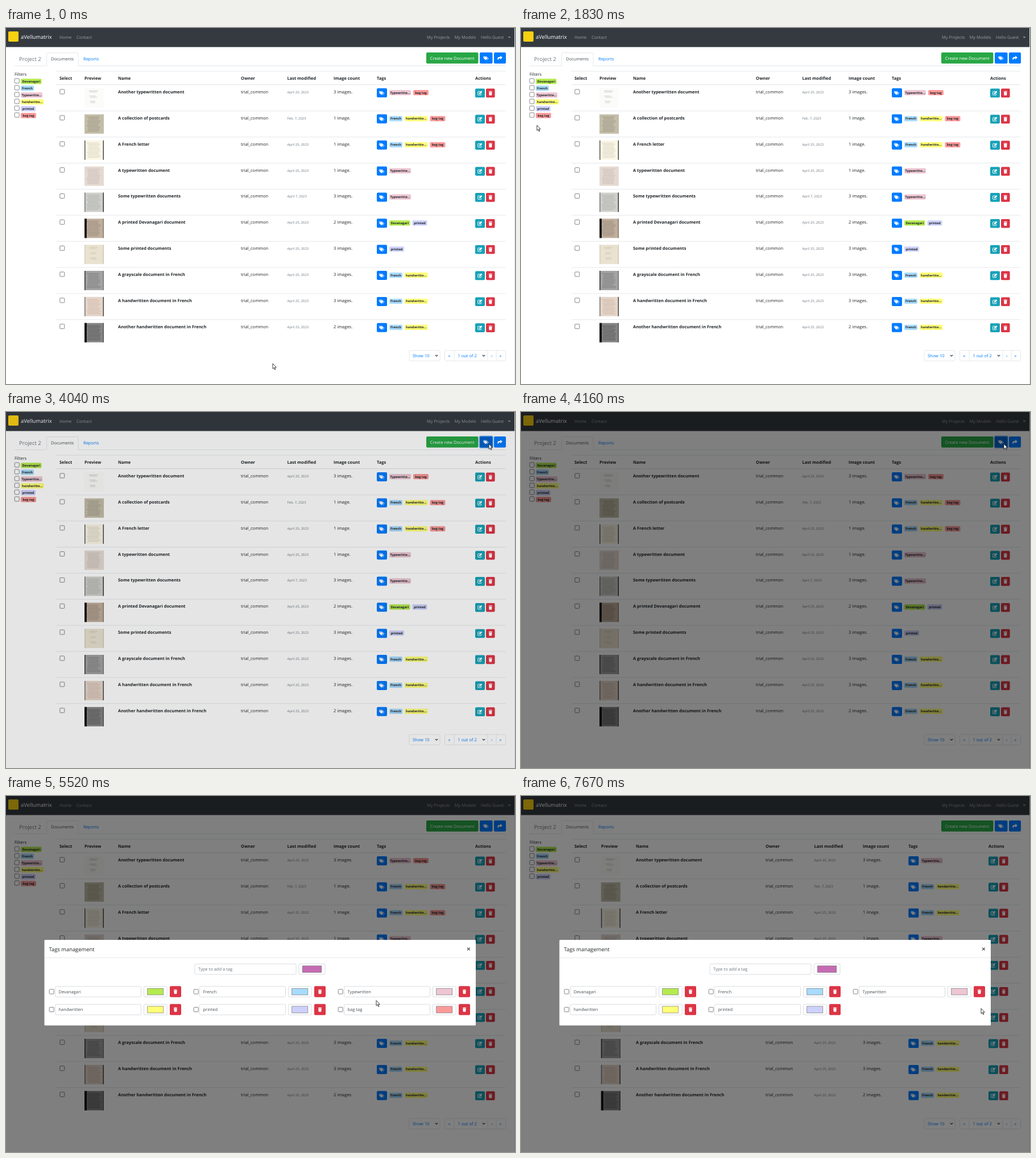
Write an HTML page that moves like this. It is 895 by 626 pixels and loops after 8000 ms.

```html
<!DOCTYPE html>
<html lang="en">
<head>
<meta charset="utf-8">
<title>Documents</title>
<style>
  html, body { margin: 0; width: 100%; height: 100%; overflow: hidden; background: #fff; }
  svg { display: block; }
  text { font-family: "Open Sans", "Noto Sans", sans-serif; text-rendering: geometricPrecision; white-space: pre; }
</style>
</head>
<body>
<svg id="stage" width="895" height="626" viewBox="0 0 895 626"></svg>
<script>
const LOOP = 8000, ROW_TOP = 100, ROW_H = 45.86;
const INK = '#212529', BLUE = '#007bff', RED = '#dc3545', LINE = '#dee2e6', GREY = '#6c757d';

// name, badge width, colour
const TAGS = {
  D: ['Devanagari', 36.5, '#b5ea50'],
  F: ['French', 23, '#a8dbfd'],
  T: ['Typewritten', 38, '#edc6d3'],
  H: ['handwritten', 40.5, '#ffff78'],
  P: ['printed', 26, '#cdd1fb'],
  B: ['bag tag', 27, '#fc9a9a']
};

// name, modified, images, tags, paper, ink, left edge, right edge
const ROWS = [
  ['Another typewritten document', 'April 25, 2023', 3, 'TB', '#fbfbfa', '#b9b9b9'],
  ['A collection of postcards', 'Feb. 7, 2023', 1, 'FHB', '#c3bda9', '#8f8a78'],
  ['A French letter', 'April 25, 2023', 1, 'FHB', '#faf6e6', '#cbc6b4', '#555', '#444'],
  ['A typewritten document', 'April 25, 2023', 1, 'T', '#e4dad2', '#bfb2ad'],
  ['Some typewritten documents', 'April 7, 2023', 3, 'T', '#cfd0cb', '#a2a5a2', '#777', '#333'],
  ['A printed Devanagari document', 'April 25, 2023', 2, 'DP', '#bfae9c', '#8d7d6f', '#1c1917', '#8a7b6c'],
  ['Some printed documents', 'April 25, 2023', 3, 'P', '#e9e2d0', '#c5bda9', '#d6cebb', '#d0c8b6'],
  ['A grayscale document in French', 'April 25, 2023', 3, 'FH', '#a3a3a3', '#6f6f6f', '#333', '#777'],
  ['A handwritten document in French', 'April 25, 2023', 3, 'FH', '#e5d5c8', '#c6afa5', '#777', '#444'],
  ['Another handwritten document in French', 'April 25, 2023', 2, 'FH', '#858585', '#4b4b4b', '#0c0c0c', '#555']
];

const text = (x, y, s, fill = INK, size = 7.5, extra = '') =>
  `<text x="${x}" y="${y}" fill="${fill}" font-size="${size}" ${extra}>${s}</text>`;
const bold = (x, y, s, size = 7.45) => text(x, y, s, INK, size, 'font-weight="700"');
const rect = (x, y, w, h, fill, rx = 0, extra = '') =>
  `<rect x="${x}" y="${y}" width="${w}" height="${h}" rx="${rx}" fill="${fill}" ${extra}/>`;
const frame = (x, y, w, h, stroke = LINE, rx = 2) =>
  rect(x + .5, y + .5, w - 1, h - 1, '#fff', rx, `stroke="${stroke}" stroke-width=".8"`);
const path = (d, stroke, width = 1, fill = 'none', extra = '') =>
  `<path d="${d}" stroke="${stroke}" stroke-width="${width}" fill="${fill}" ${extra}/>`;
const hline = (x1, x2, y, width = .8) => path(`M${x1} ${y}H${x2}`, LINE, width);
const checkbox = (x, y) => rect(x, y, 8, 8, '#fff', 1.2, 'stroke="#767676" stroke-width=".9"');
const chevron = (x, y) => path(`M${x - 2.3} ${y - 1.1}l2.3 2.3 2.3-2.3`, '#343a40', 1.1);

// Icons are centred on the origin
const ICONS = {
  tags: path('M-4.8-3.1h2.9L2-.1Q2.5.4 2 .9L-.4 3.3Q-.9 3.8-1.4 3.3L-4.8-.1Z', 'none', 0, '#fff') +
        path('M-.5-3.1 3.5.3Q4 .8 3.5 1.3L1.2 3.6', '#fff', 1) +
        '<circle cx="-3.3" cy="-1.6" r=".75" fill="#007bff"/>',
  edit: path('M.8-2.6H-3.2Q-3.8-2.6-3.8-2V2.8Q-3.8 3.4-3.2 3.4H1.6Q2.2 3.4 2.2 2.8V1', '#fff', 1) +
        path('M-1.8 1.5-1.5-.2 2.2-3.9 3.9-2.2.2 1.5Z', 'none', 0, '#fff'),
  trash: path('M-3.1-3.5H-1.1L-.7-4H.7L1.1-3.5H3.1V-2.6H-3.1ZM-2.7-2H2.7L2.4 3.3Q2.3 4 1.6 4H-1.6Q-2.3 4-2.4 3.3Z', 'none', 0, '#fff'),
  share: path('M4.4-.7.7-4V-2Q-4.3-2-4.3 1.3-4.3 2.8-2.8 4-3.4.5.7.5V2.6Z', 'none', 0, '#fff')
};
const iconButton = (x, y, w, h, fill, icon, id = '') =>
  rect(x, y, w, h, fill, 2, id && `id="${id}"`) +
  `<g transform="translate(${x + w / 2} ${y + h / 2})">${ICONS[icon]}</g>`;

function badge(x, y, key) {
  const [name, width, colour] = TAGS[key];
  const label = name.length > 10 ? name.slice(0, 10) + '...' : name;
  return rect(x, y, width, 9.2, colour, 2) +
    text(x + width / 2, y + 6.6, label, INK, 5.6, 'font-weight="700" text-anchor="middle"');
}

function thumbnail(x, y, row, seed) {
  const [, , , , paper, ink, left, right] = ROWS[row];
  const random = () => (seed = seed * 16807 % 2147483647) / 2147483647;
  let out = rect(x, y, 34, 34, paper);
  const sparse = row === 0 || row === 6;
  for (let i = 0; i < 12; i++) {
    if (sparse && i % 4 > 1) continue;
    const start = sparse ? 8 + random() * 4 : 4 + random() * 3;
    out += rect(x + start, y + 4 + i * 2.3, (sparse ? 24 : 29) - start - random() * 5, .9, ink, 0, 'opacity=".75"');
  }
  if (left) out += rect(x, y, row === 5 || row === 9 ? 4 : 1.5, 34, left);
  if (right) out += rect(x + 32.5, y, 1.5, 34, right);
  return out;
}

function table(cols, hiddenTag, id) {
  const [preview, name, owner, modified, count, tags, actions] = cols;
  const heads = ['Select', 'Preview', 'Name', 'Owner', 'Last modified', 'Image count', 'Tags', 'Actions'];
  let out = [94, ...cols].map((x, i) => bold(x, 90.5, heads[i])).join('');
  ROWS.forEach((row, i) => {
    const y = ROW_TOP + i * ROW_H, base = y + 15;
    out += checkbox(94.8, y + 8) + thumbnail(preview, y + 6, i, 77 + i * 991) +
      bold(name, base, row[0]) + text(owner, base, 'trial_common') +
      text(modified, base, row[1], GREY, 5.95) +
      text(count, base, row[2] + (row[2] > 1 ? ' images.' : ' image.')) +
      iconButton(tags, y + 6, 18, 16, BLUE, 'tags') +
      iconButton(actions, y + 6.6, 17, 15.6, '#17a2b8', 'edit') +
      iconButton(actions + 19, y + 6.6, 15.6, 15.6, RED, 'trash');
    let x = tags + 22;
    for (const key of row[3]) {
      if (key === hiddenTag) continue;
      out += badge(x, y + 9, key);
      x += TAGS[key][1] + 4;
    }
  });
  return `<g id="${id}">${out}</g>`;
}

function page() {
  let out = rect(0, 0, 895, 33.5, '#343a40') + rect(4, 6, 18, 18, '#f9d012', 2) +
    text(26, 19.3, 'aVellumatrix', '#fff', 9.4);
  [[94, 'Home'], [124, 'Contact'], [740, 'My Projects'], [788.5, 'My Models'], [835, 'Hello Guest']]
    .forEach(([x, s]) => out += text(x, 18.8, s, '#9a9da0'));
  out += path('M882.5 15.3h5l-2.5 2.5Z', 'none', 0, '#9a9da0') + rect(894, 0, 1, 626, '#e4e4e4');

  out += hline(15, 878, 66.5) + path('M71.5 67V45.5q0-2 2-2H125q2 0 2 2V67', LINE, .8, '#fff') +
    text(23, 58, 'Project 2', GREY, 9.5) + text(79, 57, 'Documents', '#495057') + text(136, 57, 'Reports', BLUE) +
    rect(739, 43, 91.5, 19.5, '#28a745', 2, 'id="create"') +
    text(784.7, 55.6, 'Create new Document', '#fff', 7.5, 'text-anchor="middle"') +
    rect(831.6, 41.6, 25.3, 22.3, BLUE, 3, 'id="ring" opacity=".5"') +
    iconButton(833, 43, 22.5, 19.5, BLUE, 'tags', 'manage') +
    iconButton(858, 43, 21, 19.5, BLUE, 'share');

  out += text(15, 84, 'Filters');
  Object.keys(TAGS).forEach((key, i) => {
    const item = checkbox(15.2, 89 + i * 12) + badge(26, 89.2 + i * 12, key);
    out += key === 'B' ? `<g id="bagFilter">${item}</g>` : item;
  });

  out += rect(88.5, 0, 790, 0, '#ececec', 0, 'id="hover"') + hline(88.5, 878.5, 76) + hline(88.5, 878.5, 99.7, 1.1);
  for (let i = 1; i < 10; i++) out += hline(88.5, 878.5, ROW_TOP + i * ROW_H);
  out += table([138, 197, 413, 494.5, 576, 652, 825], '', 'before') +
    table([140.8, 202, 430, 515.5, 601, 681.3, 822], 'B', 'after');

  out += frame(708.5, 566.5, 55, 19.5) + text(715, 579, 'Show 10', BLUE) + chevron(757, 576) +
    frame(771, 566.5, 108, 19.5) + text(794.5, 579, '1 out of 2', BLUE) + chevron(840, 576);
  for (const x of [788, 847, 862]) out += path(`M${x} 567V585.5`, LINE, .8);
  [[777.5, '«'], [853, '›'], [867.5, '»']].forEach(([x, s]) => out += text(x, 578.5, s, BLUE));
  return out;
}

function modal() {
  const swatch = (x, y, w, colour) => frame(x, y, w, 19.5, '#ced4da') +
    rect(x + 6.7, y + 4, w - 13.4, 11.5, colour, 0, 'stroke="#777" stroke-width=".7"');
  let out = rect(67.5, 253, 758.5, 150.5, '#fff', 1.5) + text(75.5, 272.6, 'Tags management', INK, 9.4) +
    path('M811 266.6l4.8 4.8m0-4.8-4.8 4.8', '#444', 1.2) + hline(68, 825.5, 284.5) +
    frame(331.5, 294.7, 179, 19.5, '#ced4da') + text(338, 307.3, 'Type to add a tag', GREY) +
    swatch(514.5, 294.7, 47, '#c56bb3');
  Object.keys(TAGS).forEach((key, i) => {
    const x = 75.5 + i % 3 * 254, y = i < 3 ? 334.3 : 365.8;
    const item = checkbox(x + .7, y + 5.7) + frame(x + 10.5, y, 152, 19.5, '#ced4da') +
      text(x + 17, y + 12.6, TAGS[key][0], '#495057') + swatch(x + 166.5, y, 41.5, TAGS[key][2]) +
      iconButton(x + 212.5, y, 20, 19.5, RED, 'trash', key === 'B' ? 'bagDelete' : '');
    out += key === 'B' ? `<g id="bagField">${item}</g>` : item;
  });
  return out;
}

const pointer = 'stroke-linejoin="round"';
document.getElementById('stage').innerHTML = page() +
  rect(0, 0, 895, 626, '#000', 0, 'id="backdrop"') + `<g id="modal">${modal()}</g>` +
  path('M0 0V9.2L2.1 7.3 3.6 10.8 5 10.2 3.5 6.8H6.3Z', '#111', .8, '#fff', `id="arrow" ${pointer}`) +
  path('M-1 .4Q0-.6 1 .4V4L5 5Q5.8 5.3 5.6 6.3L4.8 10.8H-.6L-3.4 6.8Q-3.6 5.5-2.5 5.7L-1 7Z', '#111', .8, '#fff', `id="hand" ${pointer}`);

const el = id => document.getElementById(id);
const show = (id, on) => el(id).setAttribute('visibility', on ? 'visible' : 'hidden');
const clamp = v => Math.max(0, Math.min(1, v));

// start, end, number of jumps, target x, target y
const MOVES = [
  [0, 0, 1, 469, 590], [130, 280, 2, 461, 591], [590, 860, 3, 260, 313],
  [1110, 1540, 4, 15, 165], [1680, 1830, 2, 28, 171], [1980, 1980, 1, 50, 140],
  [2120, 2530, 3, 430, 94], [2820, 3620, 6, 849, 56], [4430, 4960, 5, 577, 296],
  [5110, 5520, 4, 651, 359.5], [5800, 5920, 2, 784, 374], [6200, 6320, 2, 667.5, 386],
  [6610, 7520, 7, 809, 373.5]
];

function cursorAt(t) {
  let x = 0, y = 0;
  for (const [start, end, jumps, tx, ty] of MOVES) {
    if (t < start) break;
    const done = clamp((t - start) / (end - start || 1));
    const part = (1 + Math.floor(done * (jumps - 1) + 1e-6)) / jumps;
    x += (tx - x) * part;
    y += (ty - y) * part;
  }
  return [x, y];
}

function render(t) {
  const [x, y] = cursorAt(t), opened = t >= 4040, removed = t >= 7670;
  const over = (x1, y1, x2, y2) => x >= x1 && x <= x2 && y >= y1 && y <= y2;

  const inHead = !opened && over(89, 76, 878, ROW_TOP);
  const inRows = !opened && over(89, ROW_TOP + .01, 878, ROW_TOP + 10 * ROW_H);
  const row = Math.floor((y - ROW_TOP) / ROW_H);
  show('hover', inHead || inRows);
  el('hover').setAttribute('y', inHead ? 76 : ROW_TOP + row * ROW_H);
  el('hover').setAttribute('height', inHead ? 23.7 : ROW_H);

  const onCreate = !opened && over(739, 43, 830, 62.5);
  const onManage = !opened && over(833, 43, 855, 62.5);
  const onDelete = opened && !removed && over(796, 366, 815.5, 385);
  const focused = opened && t < 4430;
  el('create').setAttribute('fill', onCreate ? '#218838' : '#28a745');
  el('manage').setAttribute('fill', focused ? '#0062cc' : onManage ? '#0069d9' : BLUE);
  el('bagDelete').setAttribute('fill', onDelete ? '#c82333' : RED);
  show('ring', focused);

  show('before', !removed);
  show('after', removed);
  show('bagFilter', !removed);
  show('bagField', !removed);

  el('backdrop').setAttribute('opacity', .5 * clamp((t - 4010) / 150));
  const slide = 1 - clamp((t - 4270) / 300);
  el('modal').setAttribute('opacity', t < 4300 ? 0 : clamp((t - 4270) / 150));
  el('modal').setAttribute('transform', `translate(0 ${-26 * slide * slide})`);

  const hand = inRows || onCreate || onManage || onDelete;
  show('hand', hand);
  show('arrow', !hand);
  el(hand ? 'hand' : 'arrow').setAttribute('transform', `translate(${x} ${y})`);
}

function tick() {
  render(performance.now() % LOOP);
  requestAnimationFrame(tick);
}
tick();
</script>
</body>
</html>
```
